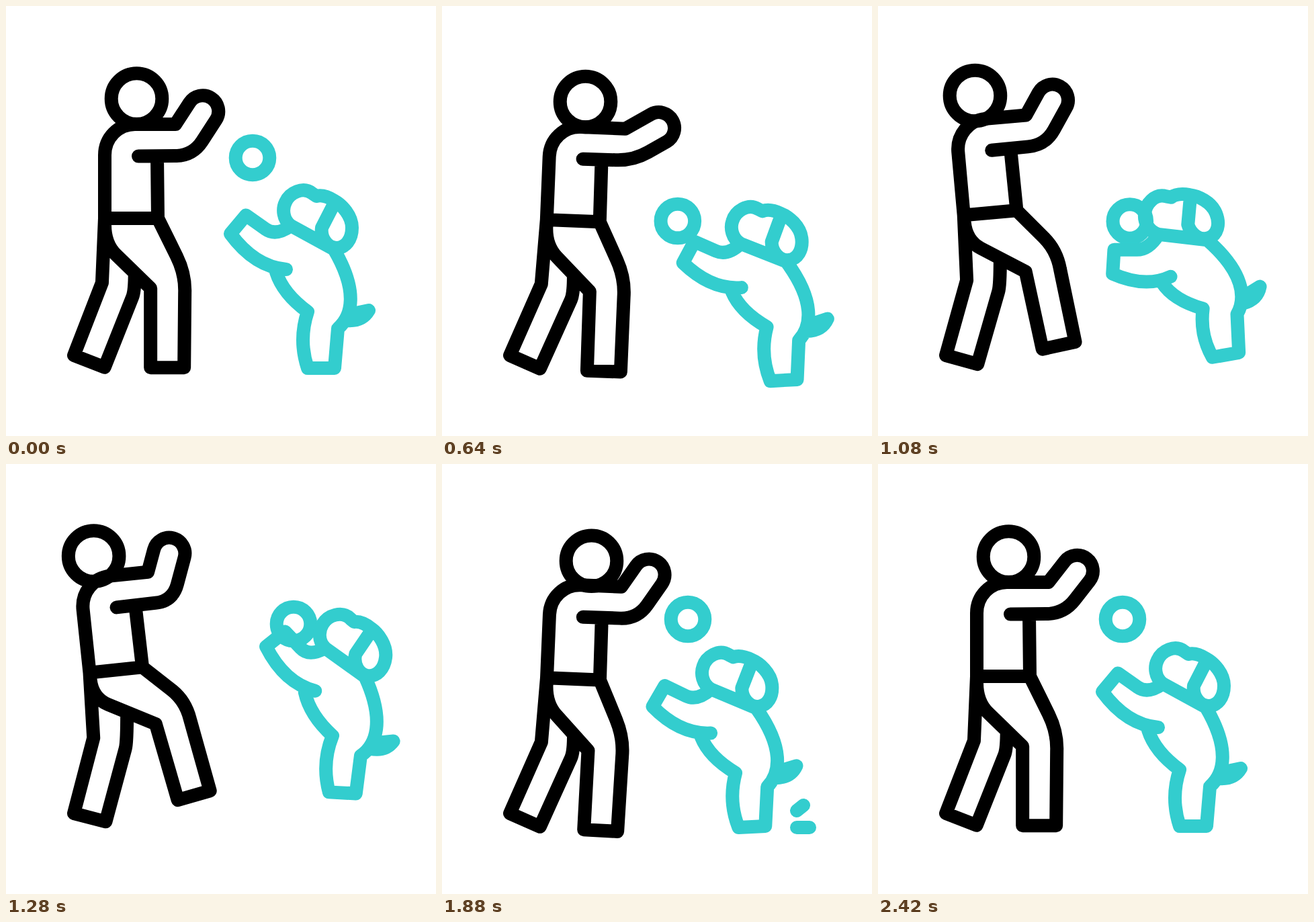
Write an HTML page that moves like this. It is 640x640 px and loops after 3600 ms.

```html
<!DOCTYPE html>
<html lang="en">
<head>
<meta charset="utf-8">
<title>Playing fetch</title>
<style>
  html, body { margin: 0; width: 100%; height: 100%; overflow: hidden; background: #fff; }
  svg { display: block; width: 100%; height: 100%; }
  .ink { fill: none; stroke-width: 20; stroke-linecap: round; stroke-linejoin: round; }
  .teal { stroke: #33cdce; }
  .black { stroke: #000; }
</style>
</head>
<body>
<svg viewBox="0 0 640 640">
  <g class="ink teal">
    <circle id="ball" r="25.3"/>
    <path id="dog"/>
    <path id="dust"/>
  </g>
  <g class="ink black">
    <path id="man"/>
    <circle id="head" r="37.8"/>
  </g>
</svg>
<script>
const LOOP = 3600, END = 2420, STEP = 20;

// man: lean, nod, forearm aim, stride; dog: head and tilt; ball
const KEYS = [
  { t: 0,    man: [0, 0, -57, 0],        dog: [464, 317, 0],   ball: [367, 226] },
  { t: 380,  man: [6.3, 7, -23, -8.8],   dog: [569, 309, 33],  ball: [385, 229] },
  { t: 880,  man: [-2.5, -4, -44, 6.5],  dog: [407, 355, -41], ball: [331, 382] },
  { t: 1280, man: [-6, -29, -75, 19],    dog: [516, 269, 7],   ball: [428, 238] },
  { t: 1580, man: [0.4, -10, -62, 5],    dog: [515, 274, 10],  ball: [430, 242] },
  { t: 1880, man: [2.4, 14, -55, -3.6],  dog: [439, 321, -6],  ball: [366, 231] },
  { t: END,  man: [0, 0, -52, 0],        dog: [464, 317, 0],   ball: [364, 231] }
];

const $ = id => document.getElementById(id);
const rad = deg => deg * Math.PI / 180;
const p = pts => pts.map(q => q[0].toFixed(2) + ' ' + q[1].toFixed(2)).join(' ');
const M = (...pts) => 'M' + p(pts);
const L = (...pts) => 'L' + p(pts);
const Q = (...pts) => 'Q' + p(pts);
const C = (...pts) => 'C' + p(pts);
const mix = (a, b, k) => [a[0] + (b[0] - a[0]) * k, a[1] + (b[1] - a[1]) * k];

// a frame of reference: local point to stage point
function frame(o, deg) {
  const c = Math.cos(rad(deg)), s = Math.sin(rad(deg));
  return (x, y) => [o[0] + x * c - y * s, o[1] + x * s + y * c];
}

// smooth curve through the keys, at rest at both ends
function pose(part, t) {
  const last = KEYS.length - 1;
  let i = 0;
  while (i < last - 1 && t >= KEYS[i + 1].t) i++;
  const d = KEYS[i + 1].t - KEYS[i].t, u = Math.min(1, (t - KEYS[i].t) / d), v = 1 - u;
  const slope = (j, n) => {
    const a = KEYS[j - 1], b = KEYS[j + 1];
    return a && b ? (b[part][n] - a[part][n]) / (b.t - a.t) : 0;
  };
  return KEYS[i][part].map((a, n) => a * v * v * (1 + 2 * u)
    + KEYS[i + 1][part][n] * u * u * (3 - 2 * u)
    + d * u * v * (slope(i, n) * v - slope(i + 1, n) * u));
}

function drawMan(t) {
  const [lean, nod, aim, stride] = pose('man', t);
  const hip = [147 + 3.75 * lean, 316 + 0.9 * lean];
  const body = frame(hip, lean), hipR = body(79, 0);

  // sleeve: two parallel edges mitred at the elbow
  const w = 23.5, hand = frame(frame(body(118, -116.5), aim)(51, 0), aim);
  const miter = w * Math.tan(rad(lean - aim) / 2);
  const outer = body(118 + miter, -93);
  const torso = M(hip) + L(body(0, -94)) + C(body(0, -120), body(20, -140), body(45, -140))
    + L(body(118 - miter, -140), hand(0, -w))
    + `A${w} ${w} 0 0 1 ` + p([hand(0, w)])
    + L(frame(outer, aim)(26, 0)) + Q(outer, body(92 + miter, -93)) + L(body(50, -92.5))
    + M(body(78, -92)) + L(hipR, hip);

  // front leg: rigid thigh, shin swings against the stride
  const knee = frame(hip, -33.2 - stride)(0, 124.5);
  const shin = frame(knee, -0.85 * stride);
  const seat = body(0, 38), under = mix(seat, knee, 0.25), bend = shin(52, -21);
  const front = M(hip) + L(body(0, 10)) + Q(seat, under)
    + L(knee, shin(0, 118), shin(50, 118), shin(51, 7))
    + Q(bend, mix(hipR, bend, 0.68)) + L(hipR);

  // rear leg pivots on the planted heel
  const rear = frame([101, 520], 21.2 + 1.1 * lean);
  const toe = rear(49, 0), calf = rear(50, -122);
  const slant = (knee[1] - under[1]) / (knee[0] - under[0]);
  const crotch = [calf[0], under[1] + slant * (calf[0] - under[0])];
  const back = M(hip) + L(rear(0, -116), rear(0, 0), toe, mix(calf, toe, 0.08)) + Q(calf, crotch);

  $('man').setAttribute('d', torso + front + back);
  place('head', frame(body(47.5, -130), lean + nod)(0, -48));
}

function drawDog(t) {
  const [x, y, tilt] = pose('dog', t);
  const h = frame([x, y], tilt), trunk = frame([x, y], 0.9 * tilt);
  const fold = 1 + Math.min(0, tilt) / 180; // limbs tuck in when crouching
  const chin = h(-40, 10), nape = h(24, 45);

  const skull = M(chin) + C(h(-52, 1), h(-53, -15), h(-48, -25))
    + C(h(-42, -39), h(-22, -49), h(-8, -38)) + L(h(-2, -34))
    + C(h(6, -36), h(14, -34), h(25, -27))
    + C(h(36, -21), h(51, -5), h(51, 13))
    + C(h(51, 31), h(41, 43), h(28, 43))
    + C(h(14, 43), h(4, 28), h(6, 13)) + L(h(25, -24))
    + M(chin) + L(nape);

  const elbow = h(-47, 75), arm = frame(elbow, 1.35 * tilt), pit = h(-62, 26);
  const paw = arm(-83 * fold, -53 * fold), tip = frame(paw, 1.65 * tilt - 50)(36, 0);
  const reach = M(chin) + Q(pit, mix(tip, pit, 0.65)) + L(tip, paw)
    + Q(arm(-47 * fold, -4 * fold), elbow);

  const waist = trunk(-15, 138), leg = frame(waist, 0.5 * tilt), len = 84 * fold;
  const foot = leg(0, len);
  const rump = M(h(-62, 79)) + Q(trunk(-52, 111), waist) + Q(leg(-len / 6, len / 2), foot)
    + L(frame(foot, 0.45 * tilt)(40, 0), trunk(30, 163))
    + C(trunk(51, 145), trunk(61, 108), nape);

  const tail = M(trunk(43, 151)) + Q(trunk(66, 153), trunk(76, 136)) + L(trunk(52, 141)) + 'Z';

  $('dog').setAttribute('d', skull + reach + rump + tail);
}

function drawDust(t) {
  const k = (t - 1770) / 220, on = k > 0 && k < 1, s = (k - 0.5) * 20;
  $('dust').setAttribute('d', on
    ? M([528 + s, 541]) + L([547 + s, 541]) + M([528 + s, 516 - s / 2]) + L([538 + s, 508 - s / 2])
    : '');
  $('dust').style.strokeWidth = on ? 20 * Math.sin(Math.PI * k) : 0;
}

function place(id, [x, y]) {
  $(id).setAttribute('cx', x);
  $(id).setAttribute('cy', y);
}

const start = performance.now();
function tick() {
  const now = Math.max(0, performance.now() - start) % LOOP;
  const t = Math.min(END, Math.floor(now / STEP) * STEP);
  drawMan(t);
  drawDog(t);
  drawDust(t);
  place('ball', pose('ball', t));
  requestAnimationFrame(tick);
}
tick();
</script>
</body>
</html>
```
